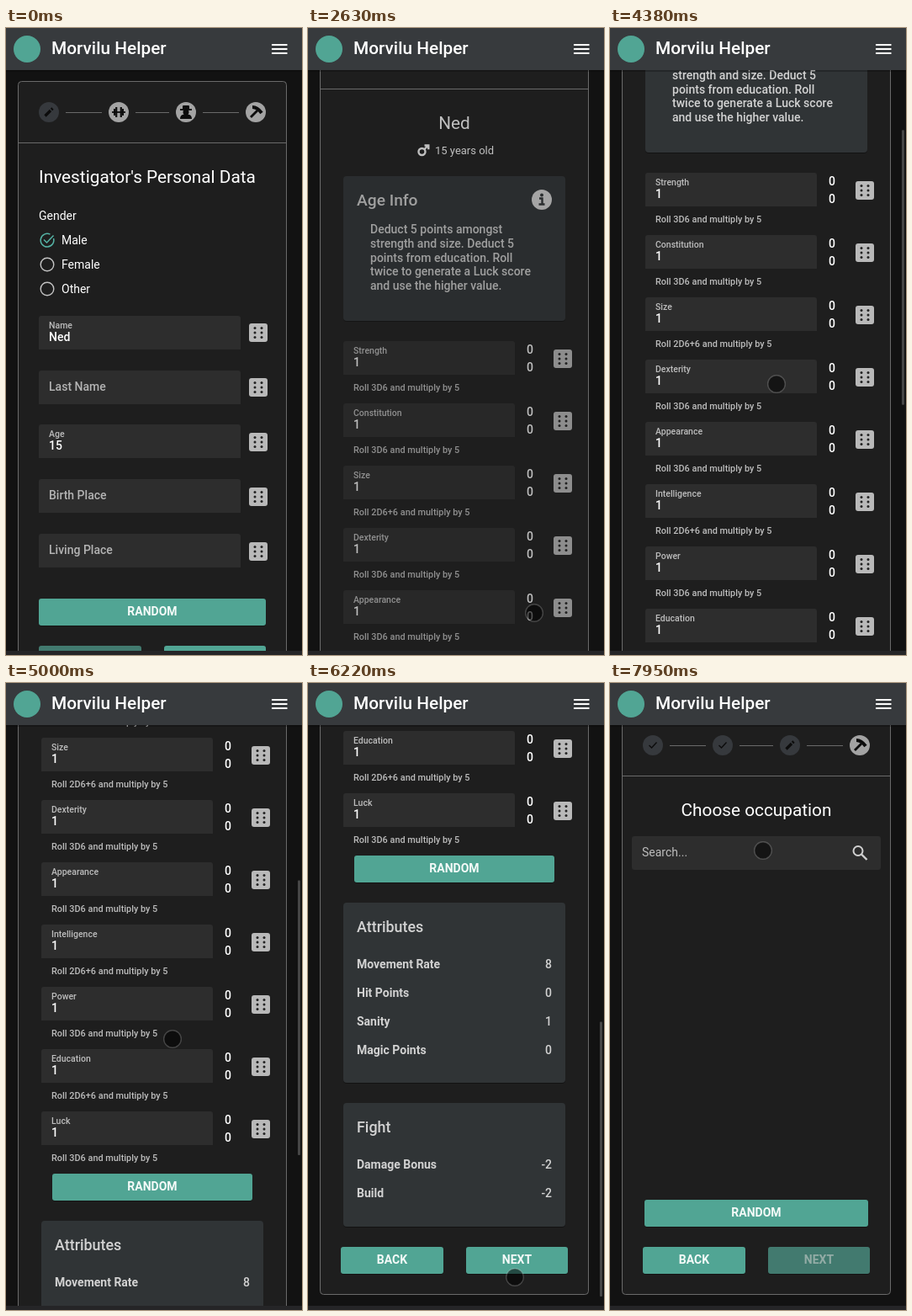
An HTML page that plays this animation: 352 px wide and 745 px high, repeating every 8000 ms.

```html
<!DOCTYPE html>
<html lang="en">
<head>
<meta charset="utf-8">
<title>Character wizard</title>
<style>
html, body { margin: 0; width: 100%; height: 100%; overflow: hidden; background: #121212; }
svg { display: block; width: 100vw; height: 100vh; font-family: Roboto, sans-serif; }
</style>
</head>
<body>
<svg id="stage" viewBox="0 0 352 745"></svg>
<script>
const LOOP = 8000, STEP = 70;
const TEAL = '#51a594', MUTED = '#bdbdbd', SOFT = '#d2d2d2', FIELD = '#2d2d2d', LINE = '#6a6a6a';

// Drawing helpers: each returns SVG markup
const rect = (x, y, w, h, fill, r = 0) =>
  `<rect x="${x}" y="${y}" width="${w}" height="${h}" rx="${r}" fill="${fill}"/>`;
const circle = (x, y, r, fill, extra = '') =>
  `<circle cx="${x}" cy="${y}" r="${r}" fill="${fill}" ${extra}/>`;
const stroke = (d, color, width) =>
  `<path d="${d}" fill="none" stroke="${color}" stroke-width="${width}"/>`;
const text = (x, y, str, { size = 14, weight = 400, fill = '#fff', anchor = 'start' } = {}) =>
  `<text x="${x}" y="${y}" font-size="${size}" font-weight="${weight}" fill="${fill}" text-anchor="${anchor}">${str}</text>`;
const title = (x, str, anchor) => text(x, 184, str, { size: 20.8, anchor });

// Stepper icons, centred on the origin
const INK = '#0c0c0c';
const ICONS = {
  check: stroke('M-4.5 0L-1.5 3L4.5 -3.5', INK, 1.4),
  pencil: stroke('M-4.5 4.5L2 -2M3 -3L4.5 -4.5', INK, 3.2),
  dumbbell: [-1, 1].map(s => stroke(`M${5 * s} -4V4`, INK, 2) + stroke(`M${2.8 * s} -6V6`, INK, 2.2)).join('') +
    stroke('M-8 0H8', INK, 1.8),
  sleuth: stroke('M-7 -3H7', INK, 1.8) + rect(-4, -8, 8, 5, INK, 1) + circle(0, 0, 3.5, INK) +
    `<path d="M-7 8q0 -6 7 -5q7 -1 7 5z" fill="${INK}"/>`,
  hammer: stroke('M-6 6L2 -2', INK, 2.8) + stroke('M-4 -6Q2 -6 7 1', INK, 4)
};

function dice(x, y) {
  let out = rect(x - 11, y - 11, 22, 22, '#b9b9b9', 3);
  for (const dx of [-4, 4]) for (const dy of [-5.5, 0, 5.5]) out += circle(x + dx, y + dy, 1.5, '#222');
  return out;
}

function field(x, y, w, label, value) {
  return rect(x, y, w, 40, FIELD, 3) + rect(x, y + 34, w, 6, FIELD) + (value
    ? text(x + 12, y + 15, label, { size: 10.5, weight: 500, fill: MUTED }) +
      text(x + 12, y + 30, value, { weight: 500 })
    : text(x + 12, y + 24, label, { weight: 500, fill: '#b4b4b4' }));
}

const button = (x, y, w, label, off = false) =>
  rect(x, y + 1, w, 32, 'rgba(0,0,0,.35)', 3) + rect(x, y, w, 32, off ? '#427a6f' : TEAL, 3) +
  text(x + w / 2, y + 20, label, { weight: 700, fill: off ? '#93aca6' : '#f4faf8', anchor: 'middle' });

const nav = (y, backOff, nextOff) =>
  button(39, y, 122, 'BACK', backOff) + button(188, y, 121, 'NEXT', nextOff);

const card = (y, h, heading, size = 17.9) =>
  rect(42, y + 1, 264, h, 'rgba(0,0,0,.4)', 4) + rect(42, y, 264, h, '#303436', 4) +
  text(58, y + 35, heading, { size, weight: 500, fill: SOFT });

const rows = (y, entries) => Object.entries(entries).map(([label, value], i) =>
  text(58, y + 34 * i, label, { weight: 700, fill: SOFT }) +
  text(290, y + 34 * i, value, { weight: 500, fill: SOFT, anchor: 'end' })).join('');

function stepper(step) {
  const xs = [51, 134, 214, 297], names = ['pencil', 'dumbbell', 'sleuth', 'hammer'];
  return xs.map((x, i) => {
    const name = i < step ? 'check' : i === step ? 'pencil' : names[i];
    const link = i ? stroke(`M${xs[i - 1] + 20} 100.5H${x - 20}`, LINE, 1) : '';
    return link + circle(x, 100, 12, i <= step ? '#36393d' : '#a3a3a3') +
      `<g transform="translate(${x} 100)">${ICONS[name]}</g>`;
  }).join('');
}

const frame = (bottom, step) =>
  `<rect x="14.5" y="63.5" width="319" height="${bottom - 63}" rx="4" fill="#1e1e1e" stroke="${LINE}"/>` +
  stroke('M14.5 136.5H333.5', LINE, 1) + stepper(step);

function personalPage() {
  let out = title(39, "Investigator's Personal Data") + text(39, 228, 'Gender');
  ['Male', 'Female', 'Other'].forEach((label, i) => {
    const y = 252 + 29 * i;
    out += text(66, y + 5, label) + (i
      ? circle(49, y, 7.8, 'none', 'stroke="#c4c4c4" stroke-width="1.4"')
      : stroke('M56.5 250A7.8 7.8 0 1 1 52.5 245.2M45 251.5l3.5 3.5 8-8.5', '#55b3a5', 1.5));
  });
  const fields = { Name: 'Ned', 'Last Name': '', Age: '15', 'Birth Place': '', 'Living Place': '' };
  Object.entries(fields).forEach(([label, value], i) => {
    out += field(39, Math.round(341.6 + 64.9 * i), 240, label, value) + dice(300, 362 + 65 * i);
  });
  return out + button(39, 678, 270, 'RANDOM') + nav(734, true, false);
}

function statsPage() {
  let out = title(174, 'Ned', 'middle') +
    circle(135.5, 211, 4, 'none', 'stroke="#fff" stroke-width="2.4"') +
    stroke('M138.5 208l4-4M138.5 203.5h4.8v4.8', '#fff', 2.4) +
    text(151, 214, '15 years old', { size: 13 }) +
    card(240, 172, 'Age Info', 19.2) +
    circle(278, 268, 12, '#dadada') + circle(278, 262.5, 2, '#303436') +
    stroke('M275 266.5h3.5v7M274.5 273.5h7', '#303436', 2.4);
  ['Deduct 5 points amongst', 'strength and size. Deduct 5', 'points from education. Roll',
    'twice to generate a Luck score', 'and use the higher value.'].forEach((line, i) => {
    out += text(74, 308 + 16.8 * i, line, { weight: 500, fill: SOFT });
  });
  ['Strength', 'Constitution', 'Size', 'Dexterity', 'Appearance', 'Intelligence', 'Power', 'Education', 'Luck']
    .forEach((label, i) => {
      const y = 436 + 74 * i;
      const roll = ['Size', 'Intelligence', 'Education'].includes(label) ? '2D6+6' : '3D6';
      const zero = dy => text(264, y + dy, '0', { weight: 500, anchor: 'middle' });
      out += field(42, y, 204, label, '1') + dice(303, y + 21) + zero(15) + zero(36) +
        text(54, y + 59, `Roll ${roll} and multiply by 5`, { size: 10.9, weight: 500, fill: MUTED });
    });
  return out + button(55, 1102, 238, 'RANDOM') +
    card(1158, 214, 'Attributes') +
    rows(1236, { 'Movement Rate': 8, 'Hit Points': 0, Sanity: 1, 'Magic Points': 0 }) +
    card(1396, 147, 'Fight') + rows(1474, { 'Damage Bonus': -2, Build: -2 }) +
    nav(1567, false, false);
}

const jobPage = () =>
  title(174, 'Choose occupation', 'middle') +
  rect(26, 208, 296, 40, FIELD, 3) + text(38, 232, 'Search...', { fill: MUTED }) +
  circle(295, 225.5, 5.5, 'none', 'stroke="#d0d0d0" stroke-width="2"') + stroke('M299 229.5l6.5 6.5', '#d0d0d0', 2.4) +
  button(41, 640, 266, 'RANDOM') + nav(696, false, true);

const pages = [
  { bottom: 790, draw: personalPage },
  { bottom: 1623, draw: statsPage },
  { bottom: 752, draw: jobPage }
];

const stage = document.getElementById('stage');
stage.innerHTML = '<g id="scroller">' + pages.map((p, i) =>
    `<g class="page">${frame(p.bottom, i)}<g class="body">${p.draw()}</g></g>`).join('') + '</g>' +
  rect(0, 740, 352, 5, '#252527') +
  rect(0, 50, 352, 2, 'rgba(0,0,0,.25)') + rect(0, 0, 352, 50, '#373a3d') +
  circle(25, 25, 16, TEAL) +
  text(54, 31, 'Morvilu Helper', { size: 20.8, weight: 500 }) +
  [0, 1, 2].map(i => rect(316, 19 + 5 * i, 18.5, 2, '#fff')).join('') +
  '<rect id="bar" x="347" width="3" rx="1" fill="#fff" fill-opacity=".22"/>' +
  '<circle id="cursor" r="10.3" fill="#000" fill-opacity=".55" stroke="#fff" stroke-opacity=".2" stroke-width="1.4"/>';

const scroller = document.getElementById('scroller');
const bar = document.getElementById('bar');
const cursor = document.getElementById('cursor');
const pageNodes = [...document.querySelectorAll('.page')];
const bodyNodes = [...document.querySelectorAll('.body')];

// Each move: start, end, then where it goes
const SCROLLS = [[790, 1200, 64], [3890, 4660, 309], [4790, 5340, 718], [5540, 6220, 897]];
const POINTER = [
  [260, 440, 306, 693], [440, 590, 263, 571], [1620, 1890, 269, 695],
  [3110, 3400, 163, 470], [3400, 3560, 198, 423], [5960, 6220, 246, 706],
  [6360, 6500, 268, 697], [7340, 7950, 182, 199]
];
const CLICKS = [2290, 6360];
const BAR_SPANS = [[790, 1300], [3890, 6550]];
const FADE_OUT = 140, FADE_IN = 280;

const clamp = v => Math.max(0, Math.min(1, v));
const easeInOut = p => p * p * (3 - 2 * p);
const easeOut = p => 1 - (1 - p) ** 1.5;

// Moves advance in even steps, the first one at the start time
function follow(from, moves, ease, t) {
  return moves.reduce((at, [start, end, ...to]) => {
    const steps = Math.floor((t - start) / STEP) + 1;
    const p = t >= end ? 1 : ease(clamp(steps * STEP / (end - start)));
    return at.map((v, i) => v + (to[i] - v) * p);
  }, from);
}

function bodyOpacity(t) {
  return Math.min(...CLICKS.map(click => {
    const age = t - click;
    return age < FADE_OUT ? clamp(1 - age / FADE_OUT) : clamp((age - FADE_OUT) / FADE_IN);
  }));
}

function render(t) {
  const index = CLICKS.filter(click => t >= click + FADE_OUT).length;
  const maxScroll = pages[index].bottom - 726;
  const scroll = Math.min(maxScroll, Math.round(follow([0], SCROLLS, easeInOut, t)[0]));
  const [x, y] = follow([162, 359], POINTER, easeOut, t);

  scroller.setAttribute('transform', `translate(0 ${-scroll})`);
  pageNodes.forEach((node, i) => node.style.display = i === index ? '' : 'none');
  bodyNodes[index].style.opacity = bodyOpacity(t);

  const ratio = 725 / (735 + maxScroll);
  bar.setAttribute('y', 4 + scroll * ratio);
  bar.setAttribute('height', 735 * ratio);
  bar.style.opacity = Math.max(...BAR_SPANS.map(([on, off]) => t < on ? 0 : clamp(1 - (t - off) / 300)));

  cursor.setAttribute('transform', `translate(${x} ${y})`);
  cursor.style.display = t < 260 ? 'none' : '';
}

const start = performance.now();
function tick() {
  render((performance.now() - start) % LOOP);
  requestAnimationFrame(tick);
}
tick();
</script>
</body>
</html>
```
